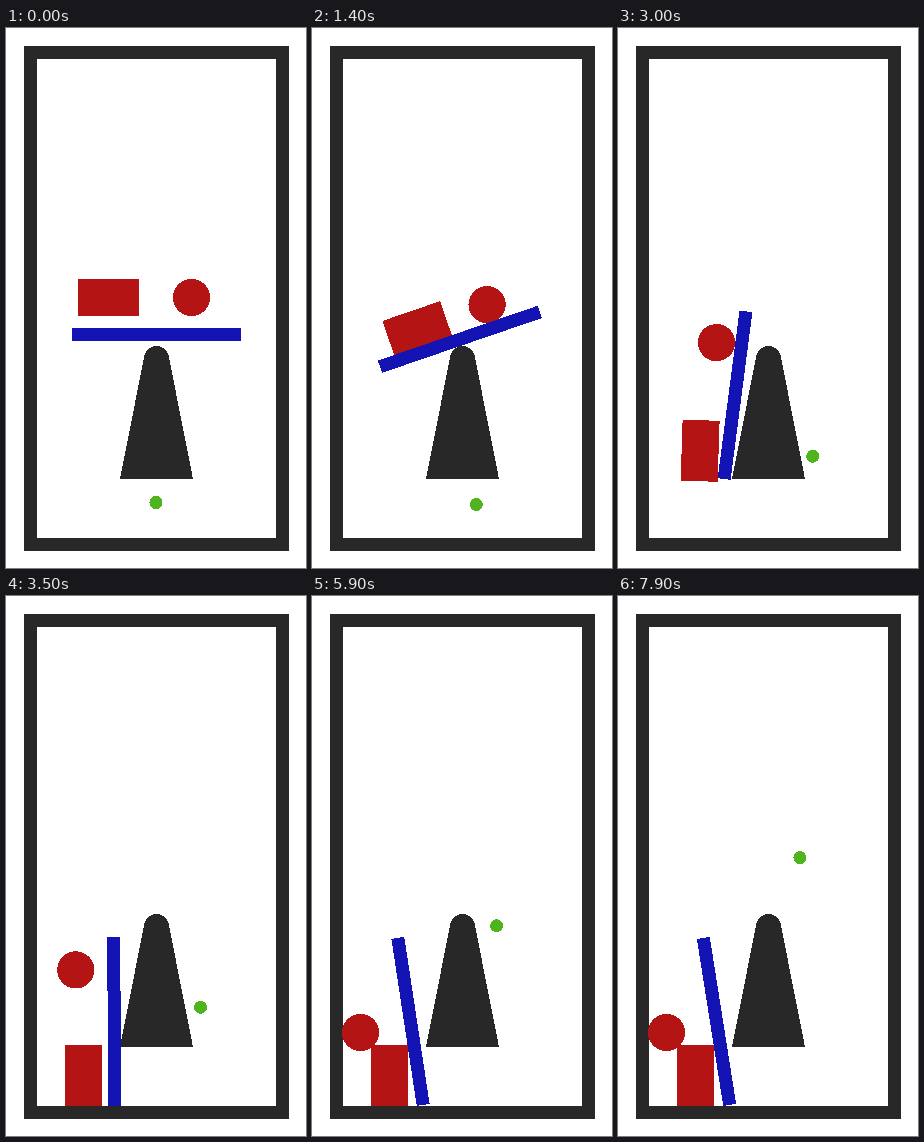
These frames come from a looping animation (300x540 px, 8 s). An HTML page:

```html
<!DOCTYPE html>
<html lang="en">
<head>
<meta charset="utf-8">
<title>Seesaw</title>
<style>
html, body { margin: 0; width: 100%; height: 100%; overflow: hidden; background: #fff; }
svg { display: block; width: 100vw; height: 100vh; shape-rendering: crispEdges; }
</style>
</head>
<body>
<svg viewBox="0 0 300 540">
  <rect x="24.5" y="24.5" width="252" height="492" fill="#fff" stroke="#282828" stroke-width="13"/>
  <g fill="#282828">
    <circle cx="150.5" cy="330.5" r="12.5"/>
    <path d="M138.2 328.5H162.8L187 451H114Z"/>
  </g>
  <rect id="block" x="-30.5" y="-18.5" width="61" height="37" fill="#b41414"/>
  <circle id="ball" r="18.6" fill="#b41414"/>
  <rect id="beam" x="-84.5" y="-6.5" width="169" height="13" fill="#1414b4"/>
  <circle id="dot" r="6.5" fill="#50b41e"/>
</svg>
<script>
const LOOP = 8000, STEP = 100;
const G = 92;                        // gravity, px/s²
const HUB = { x: 150.5, y: 330.5, r: 12.5 };
const TIP = 0.58, SLIP = 2.2;        // seconds: beam starts to tilt, beam leaves the hub
const RAD = Math.PI / 180;

const clamp = (v, lo, hi) => Math.min(hi, Math.max(lo, v));
const fall = t => G * t * t / 2;
const since = t => Math.max(0, t - TIP);
const tilt = t => -25.5 * since(t) ** 1.5;

// Place a body on the tilting beam: distance along it and height above the hub.
function ride(t, along, height) {
  const a = tilt(t), c = Math.cos(a * RAD), s = Math.sin(a * RAD);
  return { x: HUB.x + along * c + height * s, y: HUB.y + along * s - height * c, a };
}

// Continue a pose as a thrown body until it reaches the floor height.
function fly(p, t, vx, vy, floor) {
  return { x: p.x + vx * t, y: Math.min(floor, p.y + vy * t + fall(t)), a: p.a };
}

const riders = {
  beam(t) {
    const roll = -HUB.r * tilt(t) * RAD - 0.86 * since(t) ** 4;
    return ride(t, roll, Math.max(19, 24 - fall(t)));
  },
  block(t) {
    const d = since(t);
    return ride(t, -48 + 29 * d - 13.1 * d * d, Math.max(43, 61 - fall(t)));
  },
  ball(t) {
    return ride(t, 35 + 7 * since(t), Math.max(43, 61 - fall(t)));
  }
};

const fliers = {
  beam(p, t) {
    const next = fly(p, t, 0, 29, 425.4);
    next.x = 98.5 + (p.x - 98.5) * (1 - Math.min(1, t / 3)) ** 2.5;
    next.a = -99 + (p.a + 99) * Math.exp(-1.3 * t);
    return next;
  },
  block(p, t) {
    const next = fly(p, t, -15.9, 76, 479.5);
    next.x = Math.max(77.5, next.x);
    next.a = Math.max(-90, p.a - 44.4 * t);
    return next;
  },
  ball(p, t) {
    const next = fly(p, t, -57.5, 22, 433.5);
    const roll = clamp((t - 2) / 0.3, 0, 1);
    next.x = Math.max(52.5, next.x) - 4 * roll;
    next.y += 3 * roll;
    return next;
  }
};

function pose(id, t) {
  const p = riders[id](Math.min(t, SLIP));
  return t > SLIP ? fliers[id](p, t - SLIP) : p;
}

// The dot speeds up around the foot of the cone, then climbs steadily while swaying.
function dot(t) {
  if (t < SLIP) return { x: 150 + 6.28 * t ** 2.445, y: 474.5 + 4.38 * t ** 2 - 1.716 * t ** 4, a: 0 };
  return { x: 188 + 6.8 * Math.cos((t - 3.1) / 4.2 * Math.PI), y: 455.5 - 34 * (t - SLIP), a: 0 };
}

function place(id, { x, y, a }) {
  document.getElementById(id).setAttribute("transform", `translate(${x} ${y}) rotate(${a})`);
}

function draw(t) {
  for (const id in riders) place(id, pose(id, t));
  place("dot", dot(t));
}

const start = performance.now();
function tick() {
  const ms = (performance.now() - start) % LOOP;
  draw(Math.floor(ms / STEP) * STEP / 1000);
  requestAnimationFrame(tick);
}
tick();
</script>
</body>
</html>
```
